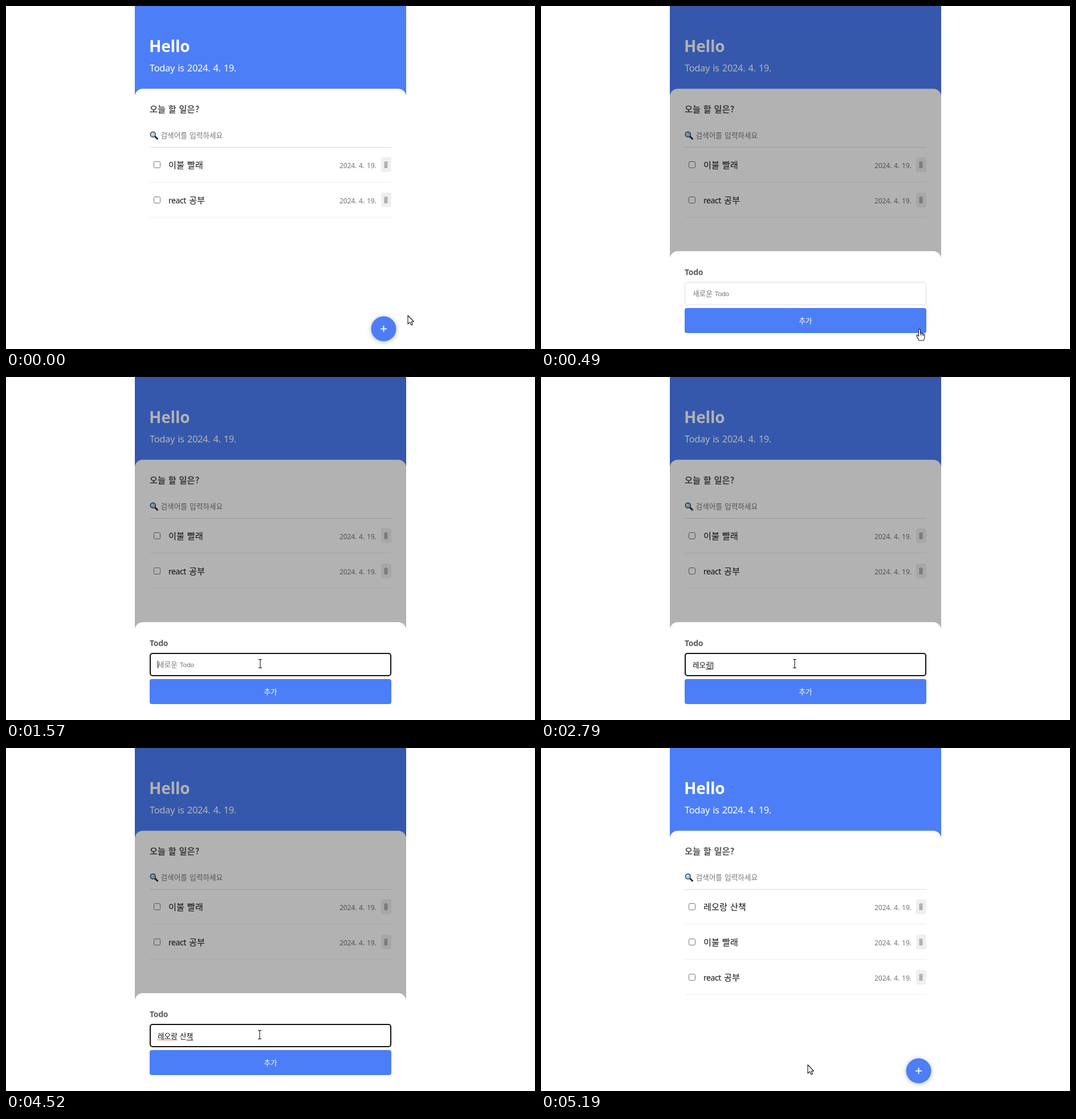
An HTML page with a canvas that plays this animation: 928x603 px, repeating every 5.45 s.

```html
<!DOCTYPE html>
<html lang="ko">
<head>
<meta charset="utf-8">
<title>Todo</title>
<style>
html, body { margin: 0; width: 100%; height: 100%; overflow: hidden; background: #fff; }
canvas { display: block; width: 928px; height: 603px; }
</style>
</head>
<body>
<canvas id="stage" width="928" height="603"></canvas>
<script>
const ctx = document.getElementById('stage').getContext('2d');
const LOOP = 5450;
const BLUE = '#4c7ef7';
const LATIN = '"Noto Sans", "Open Sans", sans-serif';
const HANGUL = '"Noto Sans CJK KR", "Noto Sans CJK JP", "Noto Sans CJK", sans-serif';
const TODAY = '2024. 4. 19.';
const OPEN = 490, FOCUS = 1170, SUBMIT = 5060, CLOSE = 5190;

// time, x, y, shape; each pose holds until the next
const pointer = [
  [0, 705, 544, 'arrow'], [70, 700, 547, 'arrow'], [140, 688, 556, 'arrow'],
  [210, 675, 563, 'hand'], [280, 666, 567, 'hand'], [350, 664, 568, 'hand'],
  [550, 651, 565, 'hand'], [620, 620, 553, 'hand'], [690, 576, 533, 'hand'],
  [760, 531, 511, 'beam'], [830, 492, 494, 'beam'], [900, 466, 485, 'beam'],
  [970, 453, 495, 'beam'], [1040, 449, 503, 'beam'], [1570, 446, 504, 'beam'],
  [1640, 445, 504, 'beam'], [4720, 449, 517, 'beam'], [4790, 461, 546, 'hand'],
  [4860, 468, 557, 'hand'], [CLOSE, 468, 557, 'arrow']
];
const clicks = [[350, OPEN], [FOCUS, 1240], [SUBMIT, CLOSE]];

// time, field value, whether its last syllable is still being composed
const typing = [
  [0, '', false], [1970, 'ㄹ', true], [2040, '레', true], [2300, '렝', true],
  [2370, '레오', true], [2590, '레올', true], [2660, '레오라', true],
  [2790, '레오랑', true], [2920, '레오랑 ', false], [3050, '레오랑 ㅅ', true],
  [3120, '레오랑 사', true], [3320, '레오랑 산', true], [3650, '레오랑 산ㅊ', true],
  [3720, '레오랑 산채', true], [3990, '레오랑 산책', true]
];
const caretOff = [[1710, 1970], [4520, SUBMIT]];

const arrow = new Path2D('M0 0V15L3.5 11.8L6 17L8.4 16L6.2 11H10.5Z');
const hand = new Path2D('M-1.6 1.2Q0-1 1.6 1.2V7Q3.2 5.8 4.3 7.8Q6 6.8 7 8.8Q9 8.2 9 11V14Q9 17 7 20H-1Q-2 17-5 12.6Q-5.6 10-3.6 10.4L-1.6 12.6Z');
const knuckles = new Path2D('M1.6 7V11M4.3 8V11.5M7 9V12');
const beam = new Path2D('M-3-7.5H-1L0-6.5L1-7.5H3M0-6.5V6.5M-3 7.5H-1L0 6.5L1 7.5H3');

const at = (keys, t) => keys.filter(k => k[0] <= t).pop();
const within = (spans, t) => spans.some(([a, b]) => t >= a && t < b);

function setType(size, family, { weight = 400, letter = 0, word = 0 } = {}) {
  ctx.font = `${weight} ${size}px ${family}`;
  ctx.letterSpacing = letter + 'px';
  ctx.wordSpacing = word + 'px';
}

function label(s, x, y, size, color, family, style) {
  setType(size, family, style);
  ctx.fillStyle = color;
  ctx.fillText(s, x, y);
  return x + ctx.measureText(s).width;
}
const latin = (s, x, y, size, color, style) => label(s, x, y, size, color, LATIN, style);
const hangul = (s, x, y, size, color, style) =>
  label(s, x, y, size, color, HANGUL, { word: 1.4, ...style });

function rect(x, y, w, h, color) {
  ctx.fillStyle = color;
  ctx.fillRect(x, y, w, h);
}

function rounded(x, y, w, h, r) {
  ctx.beginPath();
  ctx.roundRect(x, y, w, h, r);
}

function fillRounded(x, y, w, h, r, color) {
  rounded(x, y, w, h, r);
  ctx.fillStyle = color;
  ctx.fill();
}

function strokeRounded(x, y, w, h, r, color, width) {
  rounded(x + width / 2, y + width / 2, w - width, h - width, r);
  ctx.strokeStyle = color;
  ctx.lineWidth = width;
  ctx.stroke();
}

function line(x1, y1, x2, y2, color, width) {
  ctx.beginPath();
  ctx.moveTo(x1, y1);
  ctx.lineTo(x2, y2);
  ctx.strokeStyle = color;
  ctx.lineWidth = width;
  ctx.stroke();
}

function disc(x, y, r, color) {
  ctx.beginPath();
  ctx.arc(x, y, r, 0, Math.PI * 2);
  ctx.fillStyle = color;
  ctx.fill();
}

function magnifier() {
  ctx.lineCap = 'round';
  line(261.5, 229.5, 265.5, 233.5, '#2b2530', 3);
  ctx.lineCap = 'butt';
  disc(257.8, 225.8, 5.2, '#2f3a4a');
  disc(257.8, 225.8, 3.9, '#9ccbee');
  disc(256.6, 224.6, 1.6, '#d3eafa');
}

function trash(y) {
  fillRounded(658, y, 18, 26, 4, '#efefef');
  rect(663, y + 8, 7, 1.5, '#a3a3aa');
  rect(665, y + 7, 3, 1, '#b5b5bb');
  rect(663.5, y + 10, 6, 9, '#c3c3c9');
  rect(664, y + 10, 1, 9, '#9c9ca4');
  rect(666, y + 10, 1, 9, '#9c9ca4');
  rect(668, y + 10, 1, 9, '#9c9ca4');
}

function row(text, i) {
  const y = Math.round(i * 61.75);
  strokeRounded(259, 273 + y, 12, 12, 2, '#767676', 1);
  if (text.startsWith('react ')) {
    latin('react', 285, 285 + y, 14, '#111', { letter: -0.4 });
    hangul(text.slice(6), 321, 285 + y, 15.2, '#111');
  } else {
    hangul(text, 285, 285 + y, 15.2, '#111');
  }
  latin(TODAY, 585, 285 + y, 12.2, '#777', { letter: -0.2, word: 1 });
  trash(266 + y);
  rect(252, 309 + y, 424, 1, '#eee');
}

function page(items) {
  rect(0, 0, 928, 603, '#fff');
  rect(226, 0, 476, 157, BLUE);
  latin('Hello', 251, 81, 28, '#fff', { weight: 700, letter: -0.2 });
  latin('Today is ' + TODAY, 252, 115, 16.5, '#fff', { letter: -0.35, word: 1.2 });
  fillRounded(226, 145.5, 476, 300, 14, '#fff');
  hangul('오늘 할 일은?', 252, 187, 15.2, '#555', { weight: 700 });
  magnifier();
  hangul('검색어를 입력하세요', 271.5, 232, 12.6, '#757575');
  rect(252, 248, 424, 1, '#d9d9d9');
  items.forEach(row);
}

function addButton() {
  ctx.save();
  ctx.shadowColor = 'rgba(0,0,0,.28)';
  ctx.shadowBlur = 8;
  ctx.shadowOffsetY = 1;
  disc(662.5, 567.5, 22, BLUE);
  ctx.restore();
  rect(657, 566.7, 11, 1.8, '#fff');
  rect(661.6, 562, 1.8, 11, '#fff');
}

function squiggle(from, to) {
  ctx.beginPath();
  for (let x = from; x <= to; x += 1.5) {
    ctx.lineTo(x, 513 + ((x - from) / 1.5 % 2 ? -0.8 : 0.8));
  }
  ctx.strokeStyle = '#e03030';
  ctx.lineWidth = 1;
  ctx.stroke();
}

function field(t) {
  const focused = t >= FOCUS && t < SUBMIT;
  const [, value, composing] = at(typing, t);
  strokeRounded(252, 485, 424, 41, 4, focused ? '#101010' : '#ddd', focused ? 2 : 1);
  let end = 266;
  if (value) {
    end = hangul(value, 266, 511, 12.6, '#111');
  } else {
    hangul('새로운', 266, 510, 12.6, '#757575');
    latin('Todo', 305, 510, 11.6, '#757575', { letter: -0.5 });
  }
  if (!focused) return;
  if (composing) rect(end - 11.6, 513, 11.6, 1, '#111');
  if (t >= 2920) squiggle(266, 301);
  if (!within(caretOff, t)) rect(Math.round(end), value ? 501 : 499, 1, 13, '#000');
}

function sheet(t) {
  rect(226, 0, 476, 442, 'rgba(0,0,0,.3)');
  rect(226, 442, 476, 161, '#fff');
  fillRounded(226, 431, 476, 172, [14, 14, 0, 0], '#fff');
  latin('Todo', 252, 473, 14, '#5c5c5c', { weight: 700, letter: -0.3 });
  field(t);
  fillRounded(252, 531, 424, 44, 4, BLUE);
  hangul('추가', 452.4, 558, 12.6, '#fff');
}

function drawPointer(t) {
  const [, x, y, shape] = at(pointer, t);
  if (within(clicks, t)) disc(x - 1, y - 1, 11, 'rgba(205,208,60,.7)');
  ctx.save();
  ctx.translate(x, y);
  ctx.lineJoin = 'round';
  ctx.lineWidth = 1.1;
  ctx.strokeStyle = '#15151f';
  if (shape === 'beam') {
    ctx.stroke(beam);
  } else {
    const path = shape === 'hand' ? hand : arrow;
    ctx.fillStyle = '#fff';
    ctx.fill(path);
    ctx.stroke(path);
    if (shape === 'hand') ctx.stroke(knuckles);
  }
  ctx.restore();
}

function draw(t) {
  const items = ['이불 빨래', 'react 공부'];
  if (t >= CLOSE) items.unshift('레오랑 산책');
  page(items);
  if (t >= OPEN && t < CLOSE) sheet(t);
  else addButton();
  drawPointer(t);
}

const start = performance.now();
function tick() {
  draw((performance.now() - start) % LOOP);
  requestAnimationFrame(tick);
}
tick();
</script>
</body>
</html>
```
